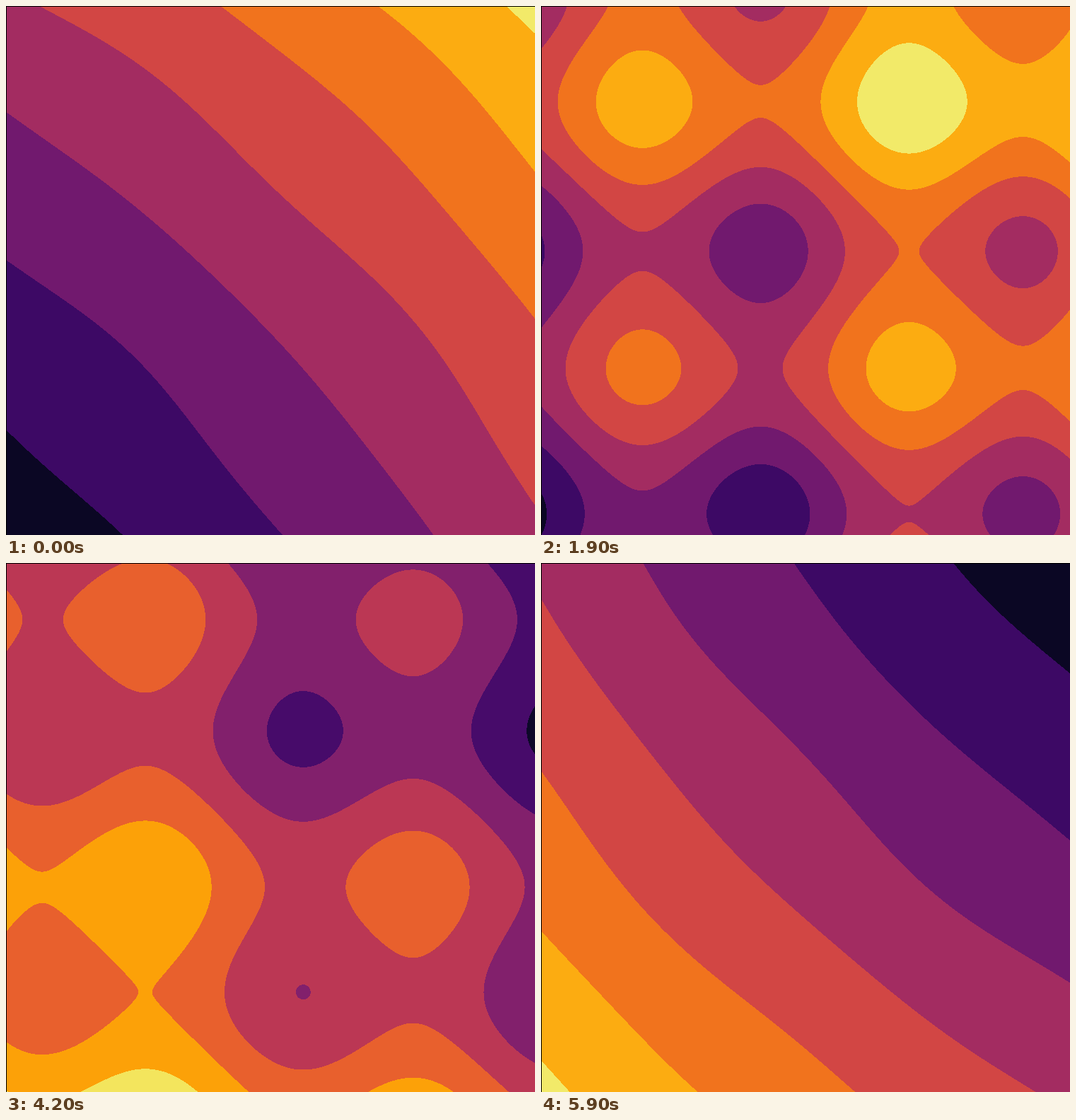
Recreate the animation shown at these times as an HTML page with a canvas. Size 748x748 px, loop 6 s.

```html
<!DOCTYPE html>
<html lang="en">
<head>
<meta charset="utf-8">
<title>Contour waves</title>
<style>
  html, body { margin: 0; width: 100%; height: 100%; overflow: hidden; background: #000; }
  canvas { display: block; width: 748px; height: 748px; }
</style>
</head>
<body>
<canvas id="stage" width="748" height="748"></canvas>
<script>
const SIZE = 748, STEPS = 60, STEP_MS = 100, TAU = Math.PI * 2;
const NICE = [1, 1.5, 2, 2.5, 3, 4, 5, 6, 8, 10];

// Band colours from dark to light, keyed by the number of bands
const PALETTES = {
  6: '110a30 57106e 9a2865 d94d3d fa9008 f4df53',
  7: '0d0829 470b6a 82206c bb3754 e8602d fca108 f3e55d',
  8: '0b0724 3d0965 71196e a32c61 d24644 f1731d fcac11 f2ea69',
  9: '09061f 320a5e 62146e 8f2469 bb3754 e05536 f78212 fbb61a f1ec6d'
};
const toPixel = hex => {
  const n = parseInt(hex, 16);
  return (255 << 24 | (n & 255) << 16 | (n & 0xff00) | n >> 16) >>> 0;
};
for (const n in PALETTES) PALETTES[n] = PALETTES[n].split(' ').map(toPixel);

const ctx = document.getElementById('stage').getContext('2d');
const image = ctx.createImageData(SIZE, SIZE);
const pixels = new Uint32Array(image.data.buffer);
const BLACK = toPixel('000000');
const xs = new Float64Array(SIZE), ys = new Float64Array(SIZE);

// Smallest round interval that cuts the range into at most eight parts
function niceStep(range) {
  const raw = range / 8;
  const scale = 10 ** Math.floor(Math.log10(raw));
  return scale * NICE.find(s => s * scale >= raw);
}

const extent = list => [Math.min(...list), Math.max(...list)];

// z = cos(x + t) + sin(y + t) + cosh(x / 25 - t) + cosh(y / 25 - t)
function draw(step) {
  const t = (2 * step / (STEPS - 1) - 1) * TAU;
  for (let i = 0; i < SIZE; i++) {
    const x = (2 * (i - 0.5) / SIZE - 1) * TAU, y = -x;
    xs[i] = Math.cos(x + t) + Math.cosh(x / 25 - t);
    ys[i] = Math.sin(y + t) + Math.cosh(y / 25 - t);
  }
  const [x0, x1] = extent(xs), [y0, y1] = extent(ys);
  const h = niceStep(x1 + y1 - x0 - y0);
  const low = Math.floor((x0 + y0) / h);
  const count = Math.ceil((x1 + y1) / h) - low;
  const colors = PALETTES[Math.max(6, Math.min(9, count))];

  for (let j = 0, p = 0; j < SIZE; j++) {
    for (let i = 0; i < SIZE; i++, p++) {
      pixels[p] = i && j ? colors[Math.floor((xs[i] + ys[j]) / h) - low] : BLACK;
    }
  }
  ctx.putImageData(image, 0, 0);
}

const start = performance.now();
let shown = -1;
function tick() {
  const step = Math.floor((performance.now() - start) / STEP_MS) % STEPS;
  if (step !== shown) draw(shown = step);
  requestAnimationFrame(tick);
}
tick();
</script>
</body>
</html>
```
